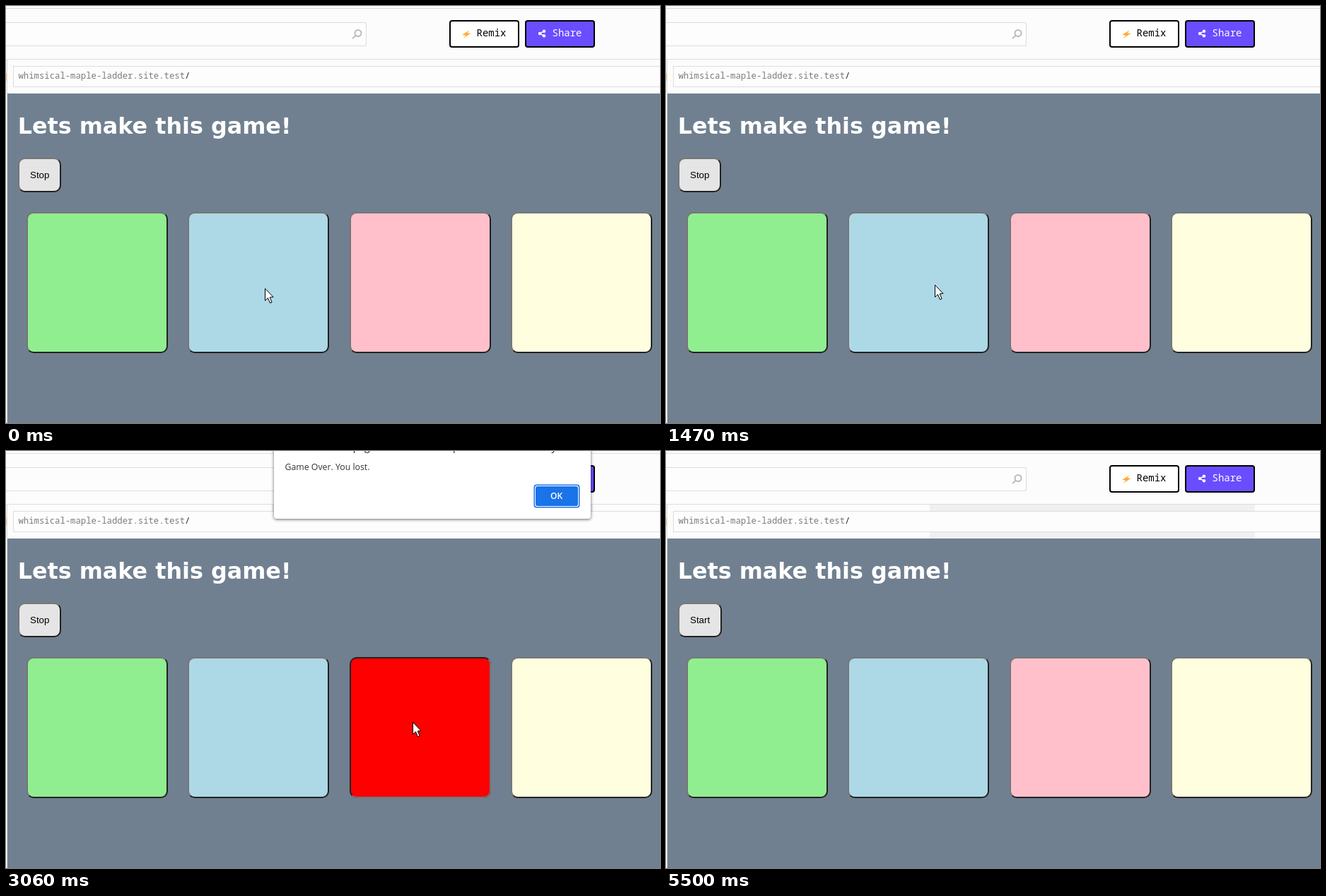
These frames come from a looping animation (925x591 px, 6.31 s). An HTML page with a canvas:

```html
<!DOCTYPE html>
<html lang="en">
<head>
<meta charset="utf-8">
<title>Memory game</title>
<style>
html, body { margin: 0; width: 100%; height: 100%; overflow: hidden; background: #fcfcfc; }
canvas { display: block; }
</style>
</head>
<body>
<canvas id="stage" width="925" height="591"></canvas>
<script>
const ctx = document.getElementById('stage').getContext('2d');
const LOOP = 6310;
const TICK = 132; // the pointer is redrawn at this interval
const OPEN = 2940, LOST = 2800, CLOSE = 4960, GONE = 5110;
const HOST = 'whimsical-maple-ladder.site.test';
const MONO = '"Noto Sans Mono", "DejaVu Sans Mono", monospace';
const UI = '"Open Sans", "Noto Sans", sans-serif';
const COLORS = ['#90ee90', '#add8e6', '#ffc0cb', '#ffffe0'];

// Eased pointer moves: start, end, target.
const MOVES = [
  { from: 130, to: 528, x: 546, y: 390 },
  { from: 660, to: 1452, x: 380, y: 395 },
  { from: 1980, to: 2112, x: 395, y: 392 },
  { from: 2450, to: 2772, x: 575, y: 384 },
  { from: 3100, to: 3696, x: 788, y: 83 },
  { from: 3696, to: 4400, x: 788, y: 71 },
  { from: 4752, to: 5412, x: 103, y: 262 }
];

const within = (t, start, length) => t >= start && t < start + length;
const smooth = u => u * u * (3 - 2 * u);

function rect(x, y, w, h, color) {
  ctx.fillStyle = color;
  ctx.fillRect(x, y, w, h);
}

function round(x, y, w, h, r, color) {
  ctx.fillStyle = color;
  ctx.beginPath();
  ctx.roundRect(x, y, w, h, r);
  ctx.fill();
}

function dot(x, y, r, color) {
  ctx.fillStyle = color;
  ctx.beginPath();
  ctx.arc(x, y, r, 0, Math.PI * 2);
  ctx.fill();
}

function line(path, width, color) {
  ctx.strokeStyle = color;
  ctx.lineWidth = width;
  ctx.stroke(new Path2D(path));
}

function text(str, x, y, font, color, align = 'left') {
  ctx.font = font;
  ctx.fillStyle = color;
  ctx.textAlign = align;
  ctx.fillText(str, x, y);
}

// Button with a two-tone bevel, split along the corner diagonals.
function bevel(x, y, w, h, color, pressed) {
  const r = 10, light = '#767676', dark = '#222';
  round(x, y, w, h, r, pressed ? dark : light);
  ctx.save();
  ctx.beginPath();
  ctx.moveTo(x + w, y);
  ctx.lineTo(x + w - r, y + r);
  ctx.lineTo(x + r, y + h - r);
  ctx.lineTo(x, y + h);
  ctx.lineTo(x + w, y + h);
  ctx.clip();
  round(x, y, w, h, r, pressed ? light : dark);
  ctx.restore();
  round(x + 2, y + 2, w - 4, h - 4, r - 2, color);
}

function field(x, y, w, h, r) {
  round(x, y, w, h, r, '#ddd');
  round(x + 1, y + 1, w - 2, h - 2, r, '#fdfdfd');
}

function toolButton(x, label, fill, color) {
  round(x, 20, 99, 39, 4, '#000');
  round(x + 2, 22, 95, 35, 2, fill);
  text(label, x + 38.5, 43, '14px ' + MONO, color);
}

function drawToolbar() {
  rect(0, 0, 925, 591, '#fcfcfc');
  rect(0, 3, 925, 1, '#ddd');
  field(-10, 23, 520, 34, 2);
  line('M502.5 38.5a4.5 4.5 0 1 1-9 0a4.5 4.5 0 1 1 9 0M494.5 42L490 46', 2, '#bbb');

  toolButton(627, 'Remix', '#fff', '#000');
  ctx.fillStyle = '#ffac33';
  ctx.fill(new Path2D('M656 34L645 41L650.3 41.5L646.5 46L657.5 38.7L652.3 38.2Z'));

  toolButton(734, 'Share', '#694dff', '#fff');
  line('M761 35.7L755 39L761 42.3', 1.5, '#fff');
  dot(755, 39, 2.2, '#fff');
  dot(761, 35.7, 2.2, '#fff');
  dot(761, 42.3, 2.2, '#fff');
}

function drawAddress(t) {
  rect(0, 75, 925, 1, '#ddd');
  rect(1, 76, 1, 515, '#ddd');
  rect(0, 95, 1, 11, '#ffc98a');
  // The dialog leaves a faint band behind.
  if (t >= OPEN) {
    const grow = t >= CLOSE ? 3 : 0;
    rect(376 - grow, 76, 454 + 2 * grow, t < OPEN + 260 ? 9 : 48, '#f0f0f0');
  }
  field(10, 85, 930, 30, 0);
  const font = '12.28px ' + MONO;
  text(HOST, 17.5, 103, font, '#7b7b7b');
  text('/', 17.5 + ctx.measureText(HOST).width, 103, font, '#222');
}

function drawGame(t) {
  rect(2, 124, 923, 467, '#708090');
  text('Lets make this game!', 16.7, 181, 'bold 31.8px "DejaVu Sans", Verdana, sans-serif', '#fff');

  const over = t >= CLOSE;
  bevel(17, 215, over ? 62 : 61, 49, '#e5e5e5', false);
  text(over ? 'Start' : 'Stop', 34, 244, '13.333px "Liberation Sans", Arial, sans-serif', '#000');

  const press = within(t, 120, 120) || within(t, 2420, 120);
  const clue = within(t, 930, 390) || within(t, 1620, 370);
  const wrong = t >= LOST && t < CLOSE;
  COLORS.forEach((color, i) => {
    if (i === 1 && (press || clue)) color = '#00f';
    if (i === 2 && wrong) color = '#f00';
    const pressed = i === 1 && press || i === 2 && wrong;
    bevel(Math.round(29 + i * 228.4), 292, 200, 200, color, pressed);
  });
}

function drawDialog(t) {
  if (t < OPEN || t >= GONE) return;
  ctx.save();
  ctx.globalAlpha = t < OPEN + 120 || t >= CLOSE ? .5 : 1;
  ctx.translate(0, Math.min(0, Math.floor((t - OPEN) / 130) - 2));

  ctx.save();
  ctx.shadowColor = 'rgba(0,0,0,.6)';
  ctx.shadowBlur = 4;
  ctx.shadowOffsetY = 1;
  round(379, -20, 448, 118, 4, '#fff');
  ctx.restore();

  text(`An embedded page at ${HOST} says`, 395, .5, '14px ' + UI, '#202124');
  text('Game Over. You lost.', 394.5, 28.5, '12.3px ' + UI, '#333');

  const blue = t >= 4020 ? '#2f7de1' : '#1a73e8';
  round(746.5, 49.5, 65, 33, 4, blue);
  round(748, 51, 62, 30, 3, '#fff');
  round(749, 52, 60, 28, 3, blue);
  if (t >= 4840) dot(787, 71, 7.5, 'rgba(150,185,240,.4)');
  text('OK', 778.5, 70, '600 12px ' + UI, '#fff', 'center');
  ctx.restore();
}

function pointerAt(t) {
  const pos = { x: 366, y: 400 };
  for (const { from, to, x, y } of MOVES) {
    const u = smooth(Math.min(1, Math.max(0, (t - from) / (to - from))));
    pos.x += (x - pos.x) * u;
    pos.y += (y - pos.y) * u;
  }
  return pos;
}

function drawPointer(t) {
  if (t >= 5500) return;
  const { x, y } = pointerAt(Math.floor(t / TICK) * TICK);
  const arrow = new Path2D('M0 0V17L4 13.3L7 20.5L9.6 19.4L6.7 12.4L11.5 12Z');
  ctx.save();
  ctx.translate(Math.round(x) + .5, Math.round(y) + .5);
  ctx.lineJoin = 'round';
  ctx.lineWidth = 1;
  ctx.fillStyle = '#fff';
  ctx.strokeStyle = '#000';
  ctx.fill(arrow);
  ctx.stroke(arrow);
  ctx.restore();
}

const start = performance.now();

function frame() {
  const t = (performance.now() - start) % LOOP;
  drawToolbar();
  drawAddress(t);
  drawGame(t);
  drawDialog(t);
  drawPointer(t);
  requestAnimationFrame(frame);
}
frame();
</script>
</body>
</html>
```
